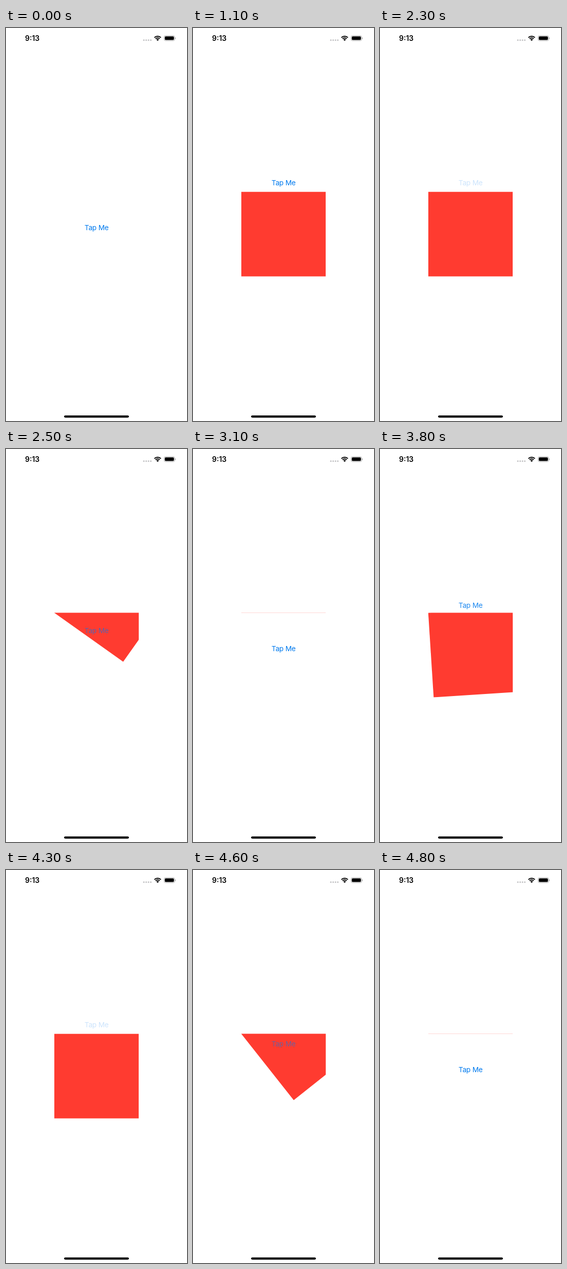
These frames come from a looping animation (352 by 762 pixels, 4900 ms). An HTML page with a canvas:

```html
<!DOCTYPE html>
<html lang="en">
<head>
<meta charset="utf-8">
<title>Pivot transition</title>
<style>
  html, body { margin: 0; width: 100%; height: 100%; overflow: hidden; background: #fff; }
  canvas { display: block; width: 352px; height: 762px; }
</style>
</head>
<body>
<canvas id="stage" width="352" height="762"></canvas>
<script>
const ctx = document.getElementById('stage').getContext('2d');
const LOOP = 4900, STEP = 100, DURATION = 350;
const SQUARE = { x: 93.8, y: 317.4, size: 164.4 };
const REST_Y = 391.5, RAISED_Y = 304.5;
const FONT = 'Inter, Roboto, sans-serif';

const clamp = v => Math.min(1, Math.max(0, v));

// Cubic ease-in-out with control points (.42, 0) and (.58, 1).
function ease(x) {
  let lo = 0, hi = 1;
  for (let i = 0; i < 24; i++) {
    const s = (lo + hi) / 2, r = 1 - s;
    const at = 3 * r * r * s * 0.42 + 3 * r * s * s * 0.58 + s * s * s;
    if (at < x) lo = s; else hi = s;
  }
  return lo * lo * (3 - 2 * lo);
}

// Each tap: when the label dims, when motion starts, and the new state.
const taps = [
  { press: 2300, start: 2303, open: false },
  { press: 3400, start: 3500, open: true },
  { press: 4300, start: 4440, open: false }
];

function poseAt(t) {
  if (t < 1100) return { shown: 0, alpha: 1 };
  const tap = taps.filter(p => t >= p.press).pop();
  if (!tap) return { shown: 1, alpha: 1 };
  const part = clamp((t - tap.start) / DURATION);
  const moved = ease(part);
  return { shown: tap.open ? moved : 1 - moved, alpha: 0.2 + 0.8 * part };
}

function pill(x, y, w, h, r, color) {
  ctx.fillStyle = color;
  ctx.beginPath();
  ctx.roundRect(x, y, w, h, r);
  ctx.fill();
}

function drawWifi(x, y) {
  const from = -Math.PI * 0.75, to = -Math.PI * 0.25;
  ctx.strokeStyle = ctx.fillStyle = '#000';
  ctx.lineWidth = 2;
  for (const r of [9, 5.8]) {
    ctx.beginPath();
    ctx.arc(x, y, r, from, to);
    ctx.stroke();
  }
  ctx.beginPath();
  ctx.moveTo(x, y);
  ctx.arc(x, y, 3.6, from, to);
  ctx.fill();
}

function drawChrome() {
  ctx.fillStyle = '#000';
  ctx.font = `600 14px ${FONT}`;
  ctx.textAlign = 'left';
  ctx.letterSpacing = '0px';
  ctx.fillText('9:13', 37, 25);

  for (let i = 0; i < 4; i++) pill(266.6 + i * 4.5, 21.9, 3, 3, 1.5, '#c2c2c4');
  drawWifi(294.9, 25);

  ctx.strokeStyle = '#a6a6a6';
  ctx.lineWidth = 0.9;
  ctx.beginPath();
  ctx.roundRect(307.4, 14.9, 20.6, 9.8, 3);
  ctx.stroke();
  pill(308.8, 16.3, 17.8, 7, 1.8, '#000');
  pill(328.9, 18.2, 1.1, 3.3, 0.6, '#a6a6a6');

  pill(113, 751.2, 126, 4.2, 2.1, '#000');
}

function drawSquare(shown) {
  const { x, y, size } = SQUARE;
  ctx.save();
  ctx.beginPath();
  ctx.rect(x, y, size, size);
  ctx.clip();
  ctx.translate(x, y);
  ctx.rotate(-Math.PI / 2 * (1 - shown));
  ctx.fillStyle = '#ff3b30';
  ctx.fillRect(0, 0, size, size);
  ctx.restore();
}

function drawLabel(shown, alpha) {
  ctx.save();
  ctx.globalAlpha = alpha;
  ctx.fillStyle = '#007aee';
  ctx.font = `400 13.7px ${FONT}`;
  ctx.letterSpacing = '-0.2px';
  ctx.textAlign = 'center';
  ctx.fillText('Tap Me', 176.2, REST_Y + (RAISED_Y - REST_Y) * shown);
  ctx.restore();
}

function render(now) {
  const t = Math.floor((now % LOOP) / STEP) * STEP;
  const { shown, alpha } = poseAt(t);
  ctx.fillStyle = '#fff';
  ctx.fillRect(0, 0, 352, 762);
  drawChrome();
  if (shown > 0) drawSquare(shown);
  drawLabel(shown, alpha);
}

const begin = performance.now();
function frame() {
  render(performance.now() - begin);
  requestAnimationFrame(frame);
}
frame();
</script>
</body>
</html>
```
